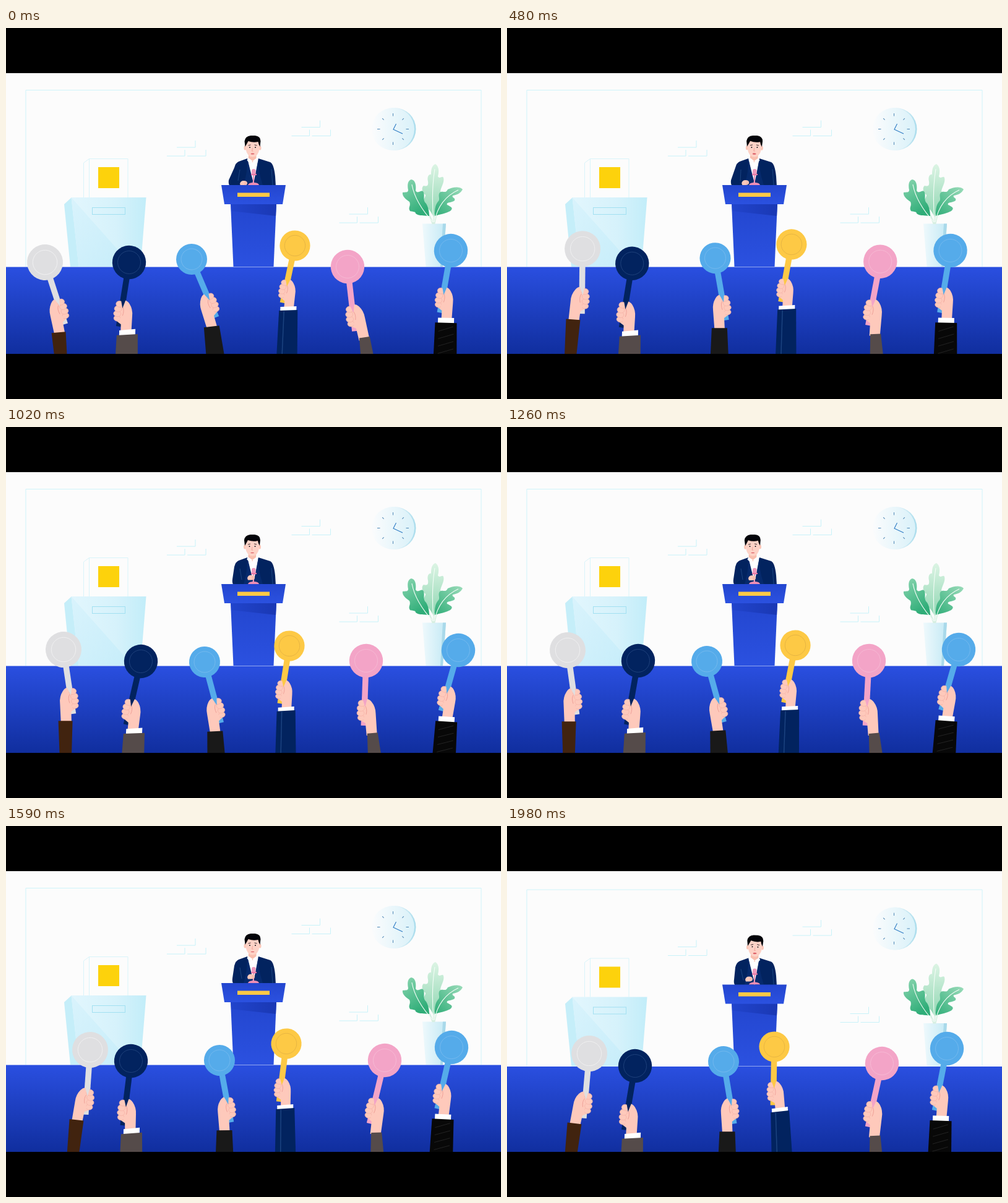
Write an HTML page that moves like this. It is 800x600 px and loops after 2.01 s.

```html
<!DOCTYPE html>
<html lang="en">
<head>
<meta charset="utf-8">
<title>Auction</title>
<style>
html, body { margin: 0; width: 100%; height: 100%; overflow: hidden; background: #000; }
svg { display: block; width: 800px; height: 600px; }
</style>
</head>
<body>
<svg viewBox="0 0 800 600" fill="none">
  <defs>
    <clipPath id="panel"><rect y="73" width="800" height="454"/></clipPath>
    <linearGradient id="floor" x2="0" y2="1"><stop stop-color="#2a4fe0"/><stop offset="1" stop-color="#102e9e"/></linearGradient>
    <linearGradient id="desk" x2="0" y2="1"><stop stop-color="#2346cf"/><stop offset="1" stop-color="#2b51e0"/></linearGradient>
    <linearGradient id="shade" x2="1" y2="0"><stop stop-color="#2144cc"/><stop offset="1" stop-color="#1a38b4"/></linearGradient>
    <linearGradient id="glass"><stop stop-color="#e2f6fd"/><stop offset=".6" stop-color="#d6f2fb"/><stop offset="1" stop-color="#c2edf9"/></linearGradient>
    <linearGradient id="fold" x2="1" y2="1"><stop stop-color="#d9f3fc"/><stop offset="1" stop-color="#c6edfa"/></linearGradient>
    <linearGradient id="dial"><stop stop-color="#fbfcfd"/><stop offset="1" stop-color="#d9f1f9"/></linearGradient>
    <linearGradient id="rim"><stop offset=".4" stop-color="#f4fafc"/><stop offset="1" stop-color="#a9dcec"/></linearGradient>
    <linearGradient id="pot"><stop stop-color="#eef9fc"/><stop offset="1" stop-color="#c4e9f5"/></linearGradient>
    <linearGradient id="pale" x2="0" y2="1"><stop stop-color="#dcf4e4"/><stop offset="1" stop-color="#8fd6b2"/></linearGradient>
    <linearGradient id="leafL" x2=".5" y2="1"><stop stop-color="#8ad6b0"/><stop offset="1" stop-color="#2fad78"/></linearGradient>
    <linearGradient id="leafR" x1="1" x2="0" y2="1"><stop stop-color="#9bdcba"/><stop offset="1" stop-color="#2fad78"/></linearGradient>
    <path id="bricks" d="M276 193h30v-11M260 207h29v-10M293 207h30v-10" stroke="#c8f2f9"/>
    <g id="hand">
      <path d="M-4 65Q4 58 11 66Q18 74 18.500 85L22 120L5 121L2.500 101L-5 97L-8 70Z" fill="#fec9bb"/>
      <g fill="#fec9bb" stroke="#f3aea3" stroke-width=".6">
        <ellipse cx="-5" cy="92.500" rx="5.500" ry="4.500"/><ellipse cx="-6" cy="85" rx="6" ry="4.800"/>
        <ellipse cx="-6" cy="77" rx="6" ry="5"/><ellipse cx="-4.500" cy="69" rx="6" ry="5"/>
      </g>
      <path d="M-3 66Q5 68 4 82L-1 94L5 100L10 78L4 64Z" fill="#fec9bb"/>
      <path d="M1 73Q5 78 3 87" stroke="#ee9f97" stroke-width=".9"/>
    </g>
  </defs>
  <g clip-path="url(#panel)">
    <rect y="73" width="800" height="454" fill="#fcfcfc"/>
    <g id="scene">
      <path d="M32 386V100.500H768V386" stroke="#cff3fa"/>
      <use href="#bricks"/><use href="#bricks" x="201.500" y="-32.500"/><use href="#bricks" x="278.500" y="108"/>

      <circle cx="628" cy="163.500" r="34.500" fill="url(#rim)"/>
      <circle cx="625.500" cy="163.500" r="34.500" fill="url(#dial)"/>
      <g id="ticks" stroke="#4f87b5"></g>
      <path d="M630.500 155L626 164L641 171" stroke="#2f7cc4" stroke-width="1.100"/>

      <path d="M134.500 274V211.500H197V274M134.500 211.500L125.500 218V274" stroke="#d9f4fa"/>
      <rect x="149" y="225" width="34" height="34" fill="#fdd20c"/>
      <path d="M94 285L106 274L118 386H104Z" fill="#c5eef9"/>
      <path d="M105.500 274H226.500L217.500 386H117.500Z" fill="url(#glass)"/>
      <path d="M105.500 274L205 386H117.500Z" fill="url(#fold)"/>
      <rect x="139.500" y="290.500" width="53" height="11" stroke="#a2e0f1"/>

      <path d="M673 316.500H711L706 386H678.500Z" fill="url(#pot)"/>
      <path d="M706 316.500H711L706 386H702Z" fill="#a9d9ea"/>
      <path d="M684 302L690 317M691 300V317M696 300L692 317" stroke="#d7efe2" stroke-width="2.500"/>
      <path d="M694 220C700 224 700 232 698 240C701 245 705 238 707 242C709 250 703 257 702 264C707 268 707 276 702 281C699 290 694 296 691 306C687 296 681 290 675 285C672 278 678 275 678 270C672 266 671 258 675 255C681 257 683 254 682 248C680 240 684 236 687 237C687 229 688 222 694 220Z" fill="url(#pale)"/>
      <path d="M655 245C662 246 663 255 662 263C666 270 672 259 675 266C677 273 673 279 679 284C683 291 684 298 684 304C674 303 667 304 662 300C662 296 657 298 653 296C649 290 655 288 652 281C646 277 640 272 641 266C645 265 650 267 650 262C648 253 650 246 655 245Z" fill="url(#leafL)"/>
      <path d="M738 261C732 255 721 258 714 261C710 269 707 262 701 266C697 271 703 277 698 281C693 287 693 296 693 304C702 301 711 300 718 296C724 291 719 289 713 286C711 281 720 283 725 279C727 274 720 275 722 271C729 270 735 267 738 261Z" fill="url(#leafR)"/>
      <path d="M693 228Q687 262 691 314M656 253Q661 282 690 314M731 262Q700 276 692 314" stroke="#f3fcf6" stroke-width="1.100"/>

      <g id="speaker">
        <path id="coat" fill="#02235f"/>
        <path d="M390 211L399 207L408 211L401 254H399Z" fill="#fff"/>
        <path d="M390 211L399 247L398 254H384Q391 230 390 211ZM408 211L401 247V254H415Q407 230 408 211Z" fill="#062a6c"/>
        <path id="seams" d="M429 228L431 254" stroke="#214984" stroke-width=".9"/>
        <g id="head">
          <path d="M-6 9H6V21L0 25L-7 21Z" fill="#f9bfae"/>
          <path d="M-7 18L0 23L7 18L9 22L4 27L0 23L-4 27L-9 22Z" fill="#fff"/>
          <ellipse cx="-12" cy="2" rx="2" ry="3.500" fill="#fcc8b9"/>
          <ellipse cx="12" cy="2" rx="2" ry="3.500" fill="#fcc8b9"/>
          <path d="M-11-9H11V4Q9 16 0 17Q-9 16-11 4Z" fill="#fdd2c6"/>
          <path d="M-12 0L-13-9Q-12-17-3-18H4Q13-17 13-9L12 0L10-4L9-8Q1-6-7-9Q-9-5-12 0Z" fill="#03040a"/>
          <path d="M-7-2L-3-3M3-3L7-2" stroke="#2b2024" stroke-width=".9"/>
          <path d="M-4.500 0v2M4.500 0v2" stroke="#17151d" stroke-width="1.500"/>
          <path d="M0 2L-1 7H1" stroke="#ee9c90" stroke-width=".8"/>
          <ellipse id="mouth" cx="0" cy="11.500" rx="3" fill="#dd6269"/>
        </g>
        <path d="M400 234V252" stroke="#ee8eb5" stroke-width="2"/>
        <path d="M391 254Q392 250 400 250Q408 250 409 254Z" fill="#ee8eb5"/>
        <rect x="397" y="228" width="6.500" height="11" rx="3" fill="#f09abd"/>
        <path d="M396 237H405" stroke="#e77ba8" stroke-width="2"/>
        <g id="fist">
          <path d="M-6 1Q-5-4 0-4Q6-4 6 0Q6 4 0 4L-5 4Z" fill="#fdc9bb"/>
          <path d="M1-1H5M1 1.500H5" stroke="#ee9f97" stroke-width=".7"/>
        </g>
      </g>
      <path d="M363 284H437L432.500 386H367.500Z" fill="url(#desk)"/>
      <path d="M363.500 285H437L436 304L364 296Z" fill="url(#shade)"/>
      <path d="M348 254H452L447 285H353Z" fill="url(#desk)"/>
      <rect x="374" y="266.500" width="52" height="6.500" fill="#fdc945"/>
      <rect y="386.500" width="800" height="141" fill="url(#floor)"/>
    </g>
    <g id="crowd"></g>
  </g>
</svg>
<script>
const LOOP = 2010, STEP = 30;
const KEYS = [0, 270, 690, 1020, 1260, 1590, 1980];
const $ = id => document.getElementById(id);

// Smooth curve through the values at KEYS.
function track(v) {
  const n = KEYS.length - 1;
  const gap = i => KEYS[i + 1] - KEYS[i];
  const rate = i => (v[i + 1] - v[i]) / gap(i);
  const slope = v.map((_, i) => {
    if (i === 0) return rate(0);
    if (i === n) return rate(n - 1);
    return (rate(i - 1) * gap(i) + rate(i) * gap(i - 1)) / (gap(i - 1) + gap(i));
  });
  return t => {
    let i = 0;
    while (i < n - 1 && t >= KEYS[i + 1]) i++;
    const h = gap(i), u = Math.min(1, (t - KEYS[i]) / h), w = 1 - u;
    return v[i] * w * w * (1 + 2 * u) + v[i + 1] * u * u * (3 - 2 * u)
      + h * u * w * (slope[i] * w - slope[i + 1] * u);
  };
}

// x, y: disc centre; tilt: paddle angle; wrist: offset from the disc;
// sleeve: top width, low width, slant; lean: sleeve angle = lean[0] + lean[1] * tilt.
const arms = [
  { color: '#dfdfe1', ring: '#f0f0f1', r: 29, side: -1, size: 1, wrist: [-14, 114.5],
    cloth: '#41230f', sleeve: [23, 17, 0], lean: [4, .5],
    x: [63, 105, 124, 93, 98, 136, 133], y: [379, 359, 360, 360, 361, 362, 368],
    tilt: [-18, -6, 2.5, -8.5, -8, 4, 5] },
  { color: '#02235f', ring: '#20427c', r: 27.2, side: 1, size: 1, wrist: [14.7, 112],
    cloth: '#554b4a', sleeve: [34, 39, 3], lean: [-1, .3], cuff: 8,
    x: [199, 192, 215, 218, 212, 202, 207], y: [379, 380, 381, 379, 378, 380, 388],
    tilt: [9, 6.5, 12.6, 13, 10, 7, 9.5] },
  { color: '#55abea', ring: '#74b9ee', r: 25, side: -1, size: .97, wrist: [-12.8, 112.7],
    cloth: '#191919', sleeve: [25, 33, 0], lean: [5.5, .55],
    x: [300, 325, 339, 321, 323, 345, 350], y: [374, 370, 376, 380, 379, 379, 381],
    tilt: [-23, -14.5, -8.5, -15, -15.5, -10.5, -9.5] },
  { color: '#fdc945', ring: '#e6b443', r: 24.6, side: 1, size: .9, wrist: [10.7, 101.5],
    cloth: '#02235f', sleeve: [30, 34, 2], lean: [-3, .4], cuff: 6, trim: 'M-7 5L-8 90',
    x: [467, 472, 448, 458, 466, 453, 432], y: [352, 349, 352, 354, 353, 352, 357],
    tilt: [12, 13.3, 7.2, 9, 11, 7, 1] },
  { color: '#f3a4c7', ring: '#f6bad4', r: 27.2, side: 1, size: 1, wrist: [14.3, 116.6],
    cloth: '#554b4a', sleeve: [17, 28, 0], lean: [-6, .3],
    x: [552, 587, 607, 582, 585, 612, 606], y: [386, 380, 377, 378, 378, 379, 384],
    tilt: [-6.5, 5, 12, 2, 3, 13.5, 12.4] },
  { color: '#55abea', ring: '#74b9ee', r: 27.2, side: 1, size: .97, wrist: [11.8, 112.4],
    cloth: '#080808', sleeve: [35, 39, 0], lean: [-2.5, .4], cuff: 8,
    trim: 'M-12 18L12 10M-12 30L13 22M-12 42L13 34M-12 54L13 46',
    x: [719, 713, 723, 731, 730, 720, 711], y: [360, 360, 360, 361, 360, 358, 360],
    tilt: [10, 8, 12, 15.7, 16, 13, 11] }
];

function buildArm(a) {
  const [top, low, slant] = a.sleeve, y = a.cuff ? a.cuff / 2 : 0;
  const cuff = a.cuff
    ? `<path d="M-13 ${slant / 2 - y}L13 ${-y - slant / 2}V${y + 2}H-13Z" fill="#fff"/>` : '';
  const trim = a.trim
    ? `<path d="${a.trim}" stroke="${a.cloth === '#02235f' ? '#1c4380' : '#2a2a2a'}" stroke-width="${a.cloth === '#02235f' ? 1.5 : .8}"/>` : '';
  $('crowd').insertAdjacentHTML('beforeend', `<g><g>
    <path d="M0 ${a.r - 3}V${105 * a.size}" stroke="${a.color}" stroke-width="9.500"/>
    <circle r="${a.r}" fill="${a.color}"/>
    <circle r="${a.r * .68}" stroke="${a.ring}" stroke-width=".9"/>
    <use href="#hand" transform="scale(${a.side * a.size} ${a.size})"/>
    <path d="M-4.500 ${59 * a.size}H4.500L1 ${75 * a.size}Z" fill="${a.color}"/>
    </g><g>${cuff}
    <path d="M${-top / 2} ${y + slant / 2}L${top / 2} ${y - slant / 2}L${low / 2} 90H${-low / 2}Z" fill="${a.cloth}"/>
    ${trim}</g></g>`);
  const [paddle, sleeve] = $('crowd').lastElementChild.children;
  const x = track(a.x), y0 = track(a.y), tilt = track(a.tilt);
  return t => {
    const px = x(t), py = y0(t), b = tilt(t), q = b * Math.PI / 180;
    const [u, v] = a.wrist, c = Math.cos(q), s = Math.sin(q);
    paddle.setAttribute('transform', `translate(${px} ${py}) rotate(${b})`);
    sleeve.setAttribute('transform',
      `translate(${px + u * c - v * s} ${py + u * s + v * c}) rotate(${a.lean[0] + a.lean[1] * b})`);
  };
}

for (let i = 0; i < 8; i++) {
  const long = i % 2 === 0;
  $('ticks').insertAdjacentHTML('beforeend',
    `<path d="M0 ${long ? -25.5 : -24.5}V-21" transform="translate(625.500 163.500) rotate(${i * 45})"/>`);
}

const drawArms = arms.map(buildArm);
const headX = track([398.5, 399.3, 400, 398, 397, 398.5, 401]);
const fistX = track([384, 383, 389, 396, 396, 396, 391]);
const fistY = track([251, 251, 248, 243.5, 244, 243.5, 245]);
const elbow = track([360, 359.5, 365, 366, 366, 366, 367]);
const mouth = track([1, .8, 1.8, .7, .8, .7, 1.2]);

function drawSpeaker(t) {
  const e = elbow(t), hx = headX(t), fx = fistX(t), fy = fistY(t);
  $('coat').setAttribute('d',
    `M390 211L376 216Q371 218 369 226L${e} 246Q${e - 1} 252 ${e + 2} 256H436L435 240Q433 220 427 217L408 211Z`);
  $('seams').setAttribute('d', `M378 229L${e + 15} 247M429 228L431 254`);
  $('head').setAttribute('transform', `translate(${hx} 192) rotate(${(hx - 398.5) * .8})`);
  $('mouth').setAttribute('ry', Math.max(.6, mouth(t)));
  $('fist').setAttribute('transform', `translate(${fx} ${fy})`);
}

const start = performance.now();
function frame(now) {
  const t = Math.floor((Math.max(0, now - start) % LOOP) / STEP) * STEP;
  const drift = Math.max(0, (t - 1620) / 360);
  $('scene').setAttribute('transform', `translate(0 ${2.5 * drift * drift})`);
  drawSpeaker(t);
  drawArms.forEach(draw => draw(t));
  requestAnimationFrame(frame);
}
frame(start);
</script>
</body>
</html>
```
